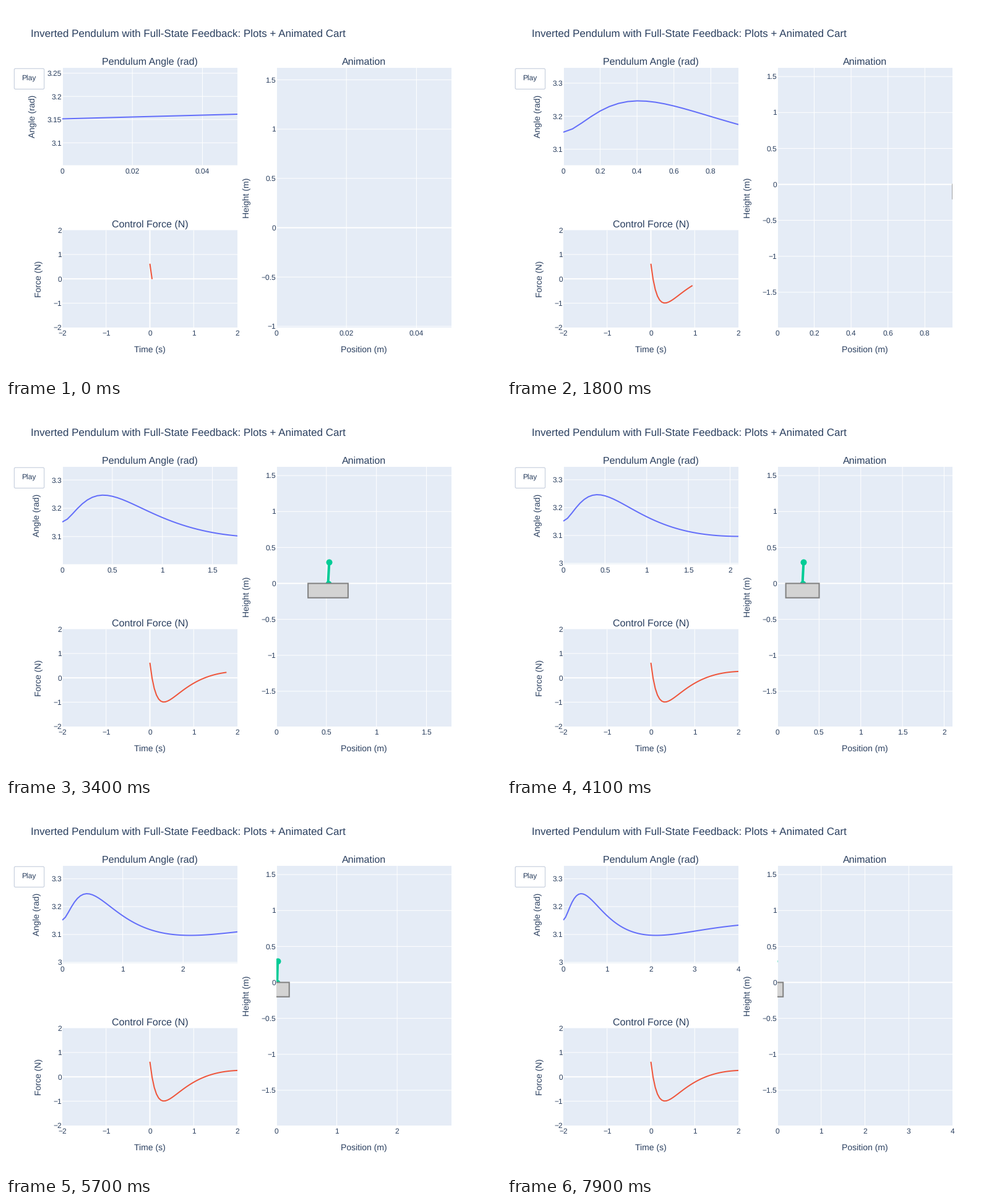
Write a matplotlib script that moves like this. It is 800 by 600 pixels and loops after 8000 ms.

```python
import math

import matplotlib.pyplot as plt
import numpy as np
from matplotlib.animation import FuncAnimation
from matplotlib.patches import FancyBboxPatch, Rectangle

plt.rcParams.update({
    "font.family": "Liberation Sans",
    "text.hinting": "none",
    "path.simplify": False,
    "toolbar": "None",
})

DPI = 100
PX = 72 / DPI
FRAMES, INTERVAL = 80, 100
DT = 0.05
INK, PANEL = "#2a3f5f", "#e5ecf6"
BLUE, RED, GREEN = "#636efa", "#ef553b", "#00cc96"


def simulate(steps):
    """Euler run of the linearised cart-pole under u = -K s."""
    M, m, b, inertia, g, l = 0.5, 0.2, 0.1, 0.006, 9.8, 0.3
    p = inertia * (M + m) + M * m * l**2
    j = inertia + m * l**2
    A = np.array([
        [0, 1, 0, 0],
        [0, -j * b / p, m**2 * g * l**2 / p, 0],
        [0, 0, 0, 1],
        [0, -m * l * b / p, m * g * l * (M + m) / p, 0],
    ])
    B = np.array([0, j / p, 0, m * l / p])
    K = np.array([-1.0, -1.6567, 18.6854, 3.4594])
    s = np.array([1.5, 0, 0.01, 0.2])
    states, forces = [], []
    for _ in range(steps + 1):
        u = -K @ s
        states.append(s)
        forces.append(u)
        s = s + DT * (A @ s + B * u)
    states = np.array(states)
    return states[:, 0], math.pi + states[:, 2], np.array(forces)


time = np.arange(FRAMES + 1) * DT
cart, angle, force = simulate(FRAMES)

fig = plt.figure(figsize=(8, 6), dpi=DPI, facecolor="white")
ax = fig.add_axes([0, 0, 1, 1])
ax.set_xlim(0, 800)
ax.set_ylim(600, 0)
ax.axis("off")


def label(x, y, s, size, ha="center", rotation=0):
    return ax.text(x, y, s, size=size * PX, color=INK, ha=ha, va="baseline",
                   rotation=rotation, rotation_mode="anchor", zorder=8)


def ticks(lo, hi, count):
    rough = (hi - lo) / count
    base = 10.0 ** math.floor(math.log10(rough))
    step = base * next((r for r in (2, 5) if r > rough / base), 10)
    first = math.ceil(lo / step - 1e-4)
    last = math.floor(hi / step + 1e-4)
    return [round(i * step, 6) for i in range(first, last + 1)]


def tick_text(v):
    return f"{v:g}".replace("-", "\u2212")


class Panel:
    def __init__(self, x, y, w, h, y_count, label_y):
        self.x, self.y, self.w, self.h = x, y, w, h
        self.y_count, self.label_y = y_count, label_y
        self.box = ax.add_patch(Rectangle((x, y), w, h, fc=PANEL, ec="none",
                                          snap=False, zorder=1))

    def set_range(self, xlim, ylim):
        self.xlim, self.ylim = xlim, ylim

    def px(self, v):
        lo, hi = self.xlim
        return self.x + (np.asarray(v) - lo) / (hi - lo) * self.w

    def py(self, v):
        lo, hi = self.ylim
        return self.y + (hi - np.asarray(v)) / (hi - lo) * self.h

    def rule(self, xs, ys, zero):
        return ax.plot(xs, ys, color="white", lw=(2 if zero else 1) * PX,
                       solid_capstyle="butt", snap=False,
                       zorder=3 if zero else 2)[0]

    def axes(self):
        """Grid, zero lines and tick labels; also returns the y label texts."""
        made, names = [], []
        right, bottom = self.x + self.w, self.y + self.h
        for v in ticks(*self.xlim, 5):
            x = float(self.px(v))
            if v == 0 or self.x + 1 < x < right - 1:
                made.append(self.rule([x, x], [self.y, bottom], v == 0))
            made.append(label(x, self.label_y, tick_text(v), 12))
        for v in ticks(*self.ylim, self.y_count):
            y = float(self.py(v))
            if v == 0 or self.y + 1 < y < bottom - 1:
                made.append(self.rule([self.x, right], [y, y], v == 0))
            names.append(tick_text(v))
            made.append(label(self.x - 1, y + 4.2, names[-1], 12, "right"))
        return made, names

    def curve(self, xs, ys, color, width, **kw):
        line, = ax.plot(self.px(xs), self.py(ys), color=color, lw=width * PX,
                        solid_capstyle="butt", solid_joinstyle="miter",
                        snap=False, zorder=4, **kw)
        line.set_clip_path(self.box)
        return line

    def rect(self, x, y, w, h):
        x0, x1 = self.px([x, x + w])
        y0, y1 = self.py([y + h, y])
        patch = ax.add_patch(Rectangle((x0, y0), x1 - x0, y1 - y0,
                                       fc="lightgray", ec="gray", lw=2 * PX,
                                       snap=False, zorder=5))
        patch.set_clip_path(self.box)
        return patch


LEFT, TOP, WIDTH, HEIGHT = 91, 100, 629, 420
COL, ROW = 0.45 * WIDTH, 0.375 * HEIGHT
RIGHT = LEFT + 0.55 * WIDTH
MID_L, MID_R = LEFT + COL / 2, RIGHT + COL / 2

angle_panel = Panel(LEFT, TOP, COL, ROW, 5, 271)
force_panel = Panel(LEFT, TOP + HEIGHT - ROW, COL, ROW, 5, 533)
scene = Panel(RIGHT, TOP, COL, HEIGHT, 10, 533)

label(40, 50, "Inverted Pendulum with Full-State Feedback: "
              "Plots + Animated Cart", 17, "left")
label(MID_L, 95, "Pendulum Angle (rad)", 16)
label(MID_L, 358, "Control Force (N)", 16)
label(MID_R, 95, "Animation", 16)
label(MID_L, 560, "Time (s)", 14)
label(MID_R, 560, "Position (m)", 14)
label(57, 441.25, "Force (N)", 14, rotation=90)
label(393, 310, "Height (m)", 14, rotation=90)
angle_title = label(54, 178.75, "Angle (rad)", 14, rotation=90)

ax.add_patch(FancyBboxPatch((13.3, 101.2), 48.4, 33.2,
                            boxstyle="round,pad=0,rounding_size=2",
                            fc="white", ec="#bec8d9", lw=PX, snap=False))
label(36.7, 121, "Play", 12)

force_panel.set_range((-2, 2), (-2, 2))
force_panel.axes()

moving = []


def draw(frame):
    while moving:
        moving.pop().remove()
    n = frame + 1
    t, th, u = time[:n + 1], angle[:n + 1], force[:n + 1]
    span = (0, t[-1])

    angle_panel.set_range(span, (th.min() - 0.1, th.max() + 0.1))
    made, names = angle_panel.axes()
    moving.extend(made)
    angle_title.set_x(47 if max(map(len, names)) > 3 else 54)
    moving.append(angle_panel.curve(t, th, BLUE, 2))

    moving.append(force_panel.curve(t, u, RED, 2))

    scene.set_range(span, (u.min() - 1, u.max() + 1))
    moving.extend(scene.axes()[0])
    x, a = cart[n], angle[n]
    moving.append(scene.curve([x, x + 0.3 * math.sin(a)],
                              [0, -0.3 * math.cos(a)], GREEN, 4,
                              marker="o", ms=10 * PX, mew=0))
    moving.append(scene.rect(x - 0.2, -0.2, 0.4, 0.2))
    return moving


anim = FuncAnimation(fig, draw, frames=FRAMES, interval=INTERVAL,
                     repeat=True, repeat_delay=0, blit=False)
plt.show()
```
